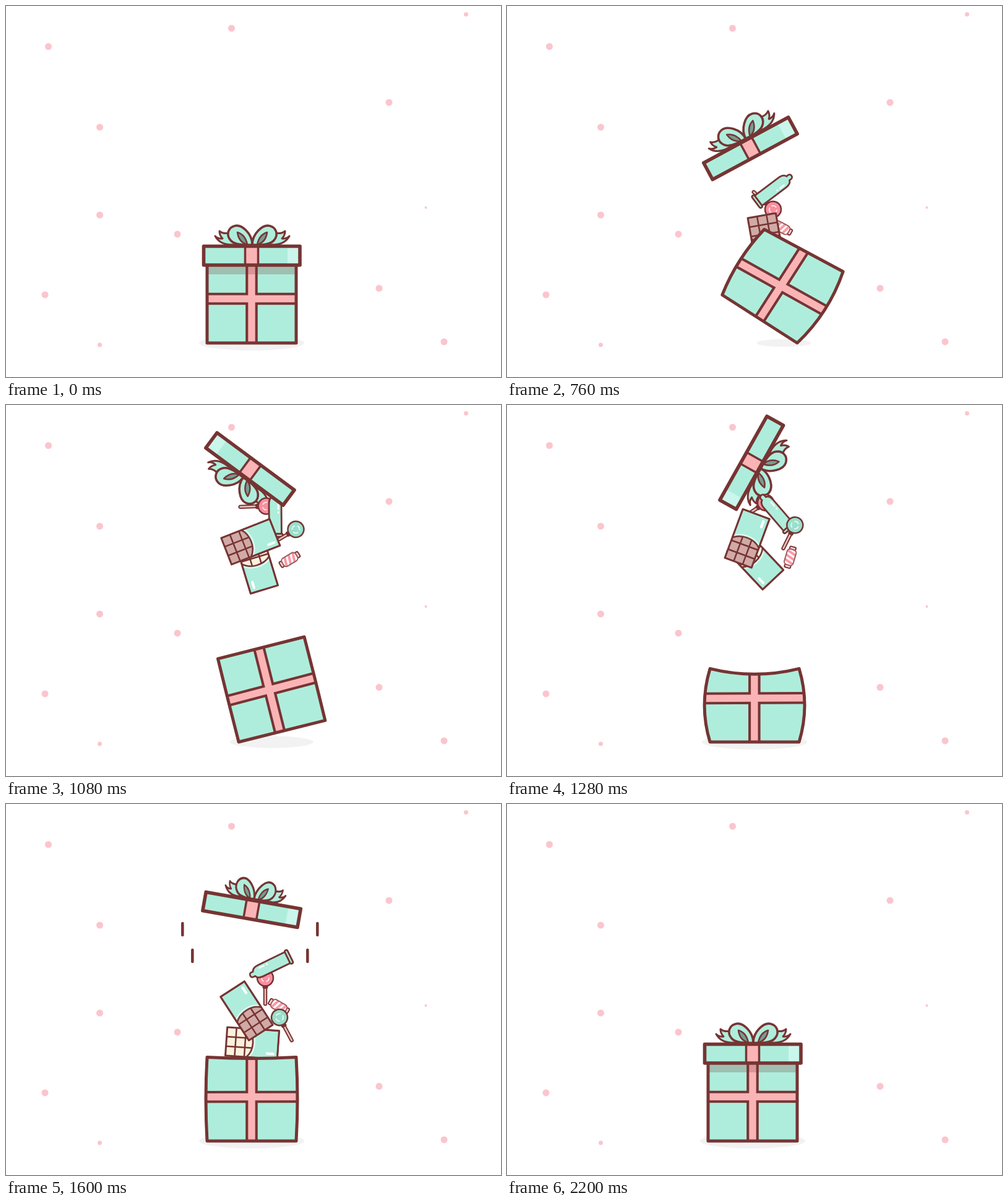
These frames come from a looping animation (800x600 px, 3280 ms). An HTML page with a canvas:

```html
<!DOCTYPE html>
<html lang="en">
<head>
<meta charset="utf-8">
<title>Gift box</title>
<style>
html, body { margin: 0; width: 100%; height: 100%; overflow: hidden; background: #fff; }
canvas { display: block; }
</style>
</head>
<body>
<canvas id="stage" width="800" height="600"></canvas>
<script>
const ctx = document.getElementById('stage').getContext('2d');
const LOOP = 3280, STEP = 40;
const SQUASHED = 360, LAUNCH = 640, APEX = 1240, LANDING = 1760, REST = 2200;
const CENTER = 397, FLOOR = 545, LID_Y = 403.5, HALF = 72;
const BROWN = '#763433', MINT = '#aeeddc', PINK = '#fab4b6', STICK = '#e9c4c1';

const DOTS = [
  [68.5, 65.5], [364.5, 36], [619, 156], [151.5, 196], [151.5, 338], [277, 369],
  [63, 467], [603, 456.5], [708, 543], [743.5, 13.5, 3.5], [151.5, 548, 3.5], [678.5, 326, 2]
];

// x and spin hold the values on the way up, at the top and on the way down.
const SWEETS = [
  { draw: () => bar('#fdf1dc'), top: 250, drop: 143, x: [415, 403, 398], spin: [205, 150, 94] },
  { draw: candy, top: 245, drop: 86, x: [444, 459, 441], spin: [28, -52, -150] },
  { draw: () => lolly('#f98f9f'), top: 156, drop: 131, x: [430, 419, 419], spin: [132, 73, 0] },
  { draw: tube, top: 172, drop: 94, x: [431, 435, 427], spin: [53, -20, -116] },
  { draw: () => lolly('#98e0cc'), top: 192, drop: 160, x: [455, 468, 442], spin: [110, 43, -28] },
  { draw: () => bar('#d1aaa6'), top: 214, drop: 126, x: [419, 391, 389], spin: [170, 43, -33] }
];

const BOW = {
  tail: new Path2D('M362 386Q345 385 338 372Q343 377 350 376Q345 371 345 364Q351 369 361 367L372 386Z'),
  loop: new Path2D('M398 386C398 368 381 353 370 355.5C359 358 355 370 363 379C369 386 384 387 398 386Z'),
  fold: new Path2D('M374 366Q387 370 390 386Q376 382 374 366Z')
};
const TUBE = new Path2D('M-10 32V-17Q-10 -27 -4 -29Q-5 -36 0 -36Q5 -36 4 -29Q10 -27 10 -17V32Z');
const WRAPPER = new Path2D('M-23 -42H23V8Q14 -1 0 -1Q-14 -1 -23 7Z');
const WRAPPER_EDGE = new Path2D('M-21 2Q-13 -4 0 -4Q13 -4 21 3');

const progress = (t, from, to) => Math.min(1, Math.max(0, (t - from) / (to - from)));
const ease = p => (1 - Math.cos(Math.PI * p)) / 2;
const bump = (t, from, to) => Math.sin(Math.PI * progress(t, from, to));
const wobble = t => t < LANDING || t >= REST ? 0
  : Math.exp((LANDING - t) / 110) * Math.sin((t - LANDING) / 55);
const parabola = ([a, b, c], u) => b + (c - a) / 2 * u + ((a + c) / 2 - b) * u * u;

function lidPose(t) {
  const lean = ease(progress(t, 0, SQUASHED));
  const turn = ease(progress(t, LAUNCH - 20, LANDING - 40));
  let y = LID_Y + 5 * wobble(t);
  if (t <= LAUNCH) y = LID_Y + 21 * lean;
  else if (t < LANDING) {
    y = 90 + 334.5 * Math.exp((LAUNCH - t) / 138) + 313.5 * progress(t, APEX, LANDING) ** 3.7;
  }
  return [CENTER - 4 * lean * (1 - turn), y, -14.7 * lean - 345.3 * turn];
}

// Sweets fly freely, but stay below the lid and above the bottom of the box.
function sweetPose({ top, drop, x, spin }, t, lidY) {
  const u = (t - 1180) / 420;
  const y = top + drop * Math.abs((t - 1207) / 400) ** 2.5;
  return [parabola(x, u), Math.min(480, Math.max(y, lidY + 50)), parabola(spin, u)];
}

function boxPose(t) {
  const since = t - LAUNCH;
  const flying = since > 0 && since < 640;
  const squash = since > 0 ? Math.exp(-since / 100) : ease(progress(t, 0, SQUASHED));
  const angle = flying ? 48.6 * Math.exp(-since / 378) * Math.sin(Math.PI * since / 320) : 0;
  const radians = angle * Math.PI / 180;
  const slide = 48 * bump(t, 800, 1290);
  const thud = bump(t, 1180, 1400), shake = 2 * bump(t, 1400, LANDING), jolt = wobble(t);
  const height = 135.5 + 7 * bump(t, LAUNCH, 1180) - 17 * thud - 5 * jolt;
  const bulge = 9 * thud + shake + 9 * jolt;
  return {
    angle,
    x: CENTER + slide + HALF * (1 - Math.cos(radians)),
    y: FLOOR - HALF * Math.abs(Math.sin(radians)),
    left: height - 47 * squash,
    right: height - 9 * squash,
    bulgeLeft: bulge + 20 * squash,
    bulgeRight: bulge + 28 * squash,
    sag: 9 * thud + shake,
    band: 71.5 - 15 * Math.sqrt(squash),
    slope: -.113 * Math.sqrt(squash),
    shift: -.075 * slide
  };
}

function paint(path, fill, width, stroke = BROWN) {
  ctx.fillStyle = fill;
  ctx.fill(path);
  if (!width) return;
  ctx.lineWidth = width;
  ctx.strokeStyle = stroke;
  ctx.stroke(path);
}

function line(x1, y1, x2, y2, width, color = BROWN) {
  ctx.lineWidth = width;
  ctx.strokeStyle = color;
  ctx.beginPath();
  ctx.moveTo(x1, y1);
  ctx.lineTo(x2, y2);
  ctx.stroke();
}

function rect(x, y, w, h, fill, width, radius = 0) {
  const path = new Path2D();
  path.roundRect(x, y, w, h, radius);
  paint(path, fill, width);
}

function ellipse(x, y, rx, ry, fill, width) {
  const path = new Path2D();
  path.ellipse(x, y, rx, ry, 0, 0, 7);
  paint(path, fill, width);
}

function at([x, y, degrees], draw) {
  ctx.save();
  ctx.translate(x, y);
  ctx.rotate(degrees * Math.PI / 180);
  draw();
  ctx.restore();
}

function bar(filling) {
  rect(-23, -42, 46, 84, filling);
  for (const x of [-7.7, 7.7]) line(x, -10, x, 41, 2.5);
  for (const y of [-4, 11.5, 27]) line(-22, y, 22, y, 2.5);
  paint(WRAPPER, MINT, 2.5);
  paint(WRAPPER_EDGE, 'transparent', 1.8, '#e8faf4');
  rect(-23, -42, 46, 84, 'transparent', 3);
  line(15, -35, 15, -25, 4, '#fff');
}

function lolly(color) {
  line(0, 14, 0, 42, 6.5);
  line(0, 14, 0, 42, 2.5, STICK);
  line(-2, 15, 2, 15, 5);
  ellipse(0, 0, 13, 13, color, 2.5);
  ctx.lineWidth = 1.8;
  ctx.strokeStyle = '#ffffffcc';
  for (let i = 0; i < 3; i++) {
    ctx.beginPath();
    ctx.arc(0, 0, 6, i * 2.1, i * 2.1 + 1.2);
    ctx.stroke();
  }
}

function tube() {
  paint(TUBE, MINT, 2.8);
  rect(-12, 31, 24, 5, MINT, 2.8, 2.5);
  line(5, -17, 5, -9, 2.5, '#fff');
  line(5, -4, 5, -3, 2.5, '#fff');
}

function candy() {
  for (const side of [-1, 1]) rect(side * 15 - 2.5, -5, 5, 10, '#fbd0d3', 2, 2);
  const shell = new Path2D();
  shell.roundRect(-13, -7.5, 26, 15, 5);
  paint(shell, '#fff');
  ctx.save();
  ctx.clip(shell);
  for (let x = -15; x <= 15; x += 7.5) line(x - 3, 9, x + 3, -9, 4, '#f79aa6');
  ctx.restore();
  paint(shell, 'transparent', 2, '#a25a5c');
}

function bow(squeeze) {
  for (const side of [1, -1]) {
    ctx.save();
    ctx.translate(1, -LID_Y);
    ctx.scale(side * squeeze, 1);
    ctx.translate(-398, 0);
    paint(BOW.tail, MINT, 3);
    paint(BOW.loop, MINT, 3.6);
    paint(BOW.fold, '#789b90', 2.5);
    ctx.restore();
  }
}

function lid() {
  ctx.translate(-CENTER, -LID_Y);
  rect(319.5, 388.5, 155.5, 30.5, MINT);
  rect(455, 388.5, 18, 30.5, '#cbf6ec');
  rect(387, 388.5, 20, 30.5, PINK);
  for (const x of [386.5, 407.5]) line(x, 389, x, 418, 3.5);
  rect(319.5, 388.5, 155.5, 30.5, 'transparent', 5.6);
}

function box(pose, shade) {
  const { left, right, bulgeLeft, bulgeRight, sag, band, slope, shift } = pose;
  const body = new Path2D();
  body.moveTo(-HALF, 0);
  body.quadraticCurveTo(-HALF - 2 * bulgeLeft, -left / 2, -HALF, -left);
  body.quadraticCurveTo(0, 2 * sag - (left + right) / 2, HALF, -right);
  body.quadraticCurveTo(HALF + 2 * bulgeRight, -right / 2, HALF, 0);
  body.closePath();
  paint(body, MINT);
  ctx.save();
  ctx.clip(body);
  for (const [width, color] of [[19.6, BROWN], [11.4, PINK]]) {
    line(shift, 10, shift, -170, width, color);
    line(-120, -band - 120 * slope, 120, -band + 120 * slope, width, color);
  }
  ctx.globalAlpha = .25 * shade;
  rect(-HALF, -130, 2 * HALF, 19, BROWN);
  ctx.restore();
  paint(body, 'transparent', 5);
}

function speedLines(t) {
  const fall = bump(t, 1520, 1680), burst = progress(t, 1780, 2140);
  for (const side of [-1, 1]) {
    if (fall > .01) {
      const half = 9.5 * fall, drop = (t - 1600) * .3;
      for (const [dx, y] of [[109, 202.5], [93, 245.5]]) {
        const x = 394.3 + side * dx;
        line(x, y + drop - half, x, y + drop + half, 4.5);
      }
    }
    if (burst > 0 && burst < 1) {
      const far = 178 - 70 * (1 - burst) ** 2, size = 18 * Math.sin(Math.PI * burst);
      for (const [y, inset] of [[465, 0], [510, 16]]) {
        const x = far - inset;
        line(CENTER + side * (x - size), y, CENTER + side * x, y, 4.5);
      }
    }
  }
}

function render(now) {
  const t = Math.floor(now % LOOP / STEP) * STEP;
  const lidAt = lidPose(t), pose = boxPose(t);
  ctx.fillStyle = '#fff';
  ctx.fillRect(0, 0, 800, 600);
  ctx.lineCap = ctx.lineJoin = 'round';
  for (const [x, y, r = 5.5] of DOTS) ellipse(x, y, r, r, '#fbc5cd');
  const radius = 85 - 1.25 * Math.abs(pose.angle);
  ellipse(pose.x + 1.2 * pose.angle, FLOOR, radius, radius / 7, '#f2f2f2');

  at(lidAt, () => bow(1 - .18 * bump(t, 1400, LANDING)));
  if (t > LAUNCH && t < LANDING) {
    for (const item of SWEETS) at(sweetPose(item, t, lidAt[1]), item.draw);
  }
  const shade = 1 - progress(t, 0, 120) + progress(t, LANDING, LANDING + 160);
  at([pose.x, pose.y, pose.angle], () => box(pose, shade));
  at(lidAt, lid);
  speedLines(t);
}

const start = performance.now();
function tick() {
  render(performance.now() - start);
  requestAnimationFrame(tick);
}
tick();
</script>
</body>
</html>
```
